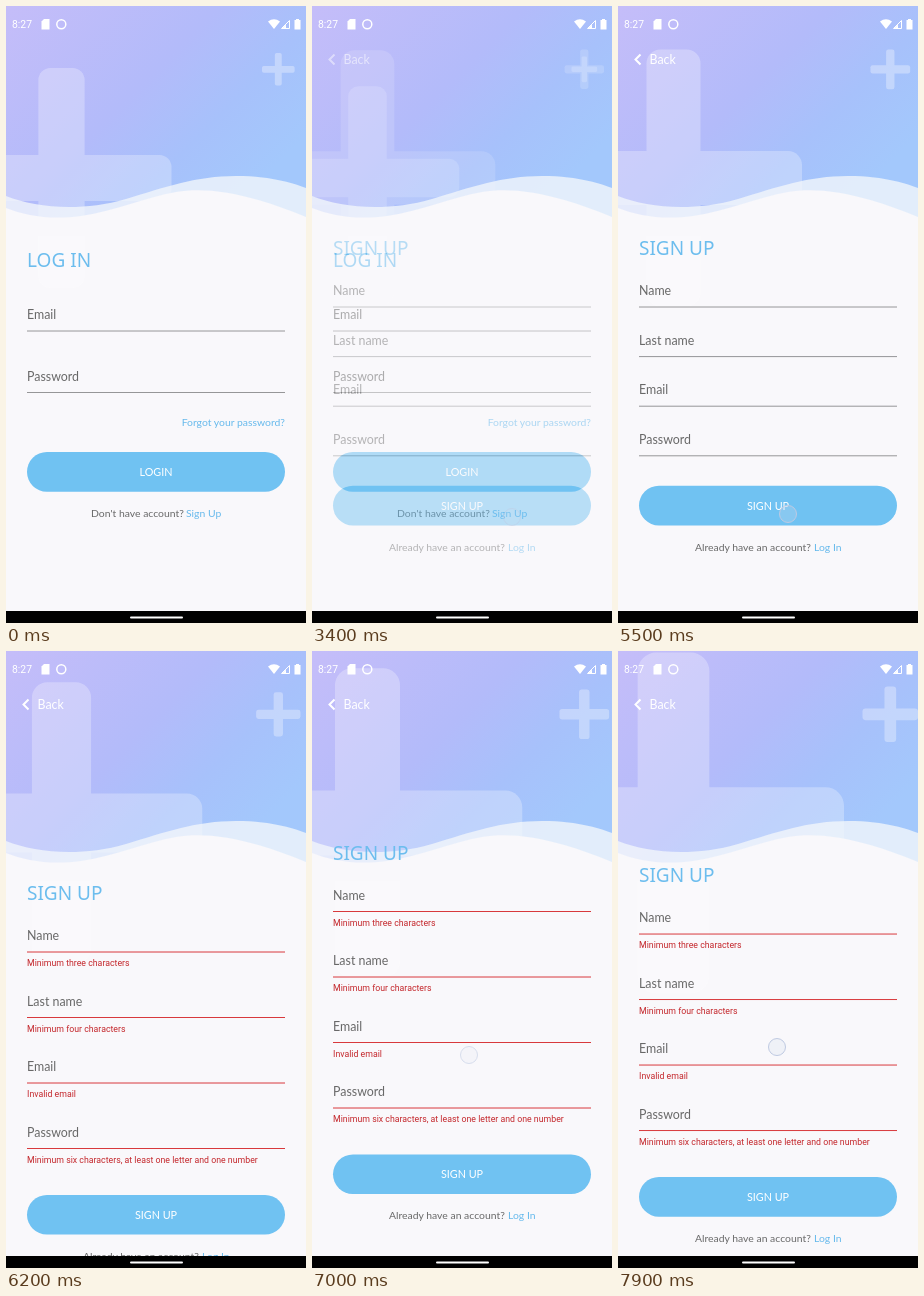
These frames come from a looping animation (300 px wide and 617 px high, 8000 ms). An HTML page:

```html
<!DOCTYPE html>
<html lang="en">
<head>
<meta charset="utf-8">
<title>Login and sign up</title>
<style>
html, body { margin: 0; width: 100%; height: 100%; overflow: hidden; background: #f9f8fb; }
svg { display: block; width: 300px; height: 617px; }
text { font-family: Lato, sans-serif; font-size: 10.4px; fill: #686868; white-space: pre; }
.title { font: 400 19px "Noto Sans", "Open Sans", sans-serif; font-stretch: extra-condensed; fill: #6cbdee; }
.label, .back { font-size: 12.4px; }
.link { fill: #66b9ec; }
.cap { font-size: 10.8px; }
.cap, .back { fill: #fff; }
.error { font-family: Roboto, sans-serif; font-size: 8.78px; fill: #c4282d; }
.clock { font-family: Roboto, sans-serif; font-size: 10.4px; fill: #fff; }
.line { stroke: #969698; stroke-width: 1; }
.line.bad { stroke: #d8393c; }
</style>
</head>
<body>
<svg id="stage" viewBox="0 0 300 617">
  <defs>
    <linearGradient id="sky" gradientUnits="userSpaceOnUse" x1="20" y1="-20" x2="235" y2="195">
      <stop offset="0" stop-color="#c5bdf9"/>
      <stop offset=".5" stop-color="#b3bbfa"/>
      <stop offset=".75" stop-color="#a7c1fb"/>
      <stop offset="1" stop-color="#a3c8fc"/>
    </linearGradient>
    <g id="plus" fill="#fff">
      <rect x="-21" y="-100" width="42" height="200" rx="11"/>
      <rect x="-100" y="-21" width="200" height="42" rx="11"/>
    </g>
  </defs>
  <g id="login"></g>
  <g id="signup"></g>
  <circle id="touch" r="8.5" fill="#d5dcec" fill-opacity=".25" stroke="#bfcae2"/>
  <g fill="#fff">
    <text class="clock" x="6" y="22">8:27</text>
    <path d="M38 13h5.5v10.5h-8V15.500z"/>
    <circle cx="55.300" cy="18.300" r="4.500" fill="none" stroke="#fff" stroke-width="1.500"/>
    <path d="M262 15.500Q268 11 274 15.500L268 23z"/>
    <path d="M275.500 22.500H283.500V14.500z" fill="none" stroke="#fff"/>
    <path d="M276 22.500H280V18.500z"/>
    <path d="M290 14V13h3v1h1.500v9.500h-6V14z"/>
  </g>
  <path d="M0 605h300v12H0z"/>
  <rect x="124" y="610.500" width="53" height="2" rx="1" fill="#fff"/>
</svg>
<script>
const LOOP = 8000;
const $ = id => document.getElementById(id);

const text = (cls, x, y, str, anchor = 'start') =>
  `<text class="${cls}" x="${x}" y="${y}" text-anchor="${anchor}">${str}</text>`;
const line = (y, cls = '') => `<path class="line ${cls}" d="M21 ${y}H279"/>`;
const button = (y, label) =>
  `<rect x="21" y="${y}" width="258" height="39.7" rx="19.85" fill="#70c2f2"/>` +
  text('cap', 150, y + 24, label, 'middle');
const field = (y, label, error) =>
  text('label', 21, y, label) + line(y + 12, error && 'bad') +
  (error ? text('error', 21, y + 26, error) : '');
const prompt = (y, x, question, linkX, link) =>
  text('', x, y, question) + text('link', linkX, y, link);

const header = `
  <path d="M0 0h300v617H0z" fill="#f9f8fb"/>
  <path d="M0 0h300v215H0z" fill="url(#sky)"/>
  <g opacity=".28"><use class="big" href="#plus"/></g>
  <g opacity=".33"><use class="small" href="#plus"/></g>
  <path d="M0 190C30 202 75 206 120 193C160 181 190 170 230 170C262 170 285 176 300 182V230H0z" fill="#f4f8fb" fill-opacity=".78"/>
  <path d="M0 202C20 210 45 214 75 210C110 205 140 191 170 186C200 181 240 186 300 211V230H0z" fill="#f9f8fb"/>`;

function form(errors) {
  const names = ['Name', 'Last name', 'Email', 'Password'];
  const step = errors ? 65.5 : 49.6;
  const shift = errors ? 64.2 : 0;
  return text('title', 21, 249, 'SIGN UP') +
    names.map((name, i) => field(289 + i * step, name, errors && errors[i])).join('') +
    button(479.7 + shift, 'SIGN UP') +
    prompt(544.7 + shift, 77, 'Already have an account?', 196, 'Log In');
}

$('login').innerHTML = header +
  text('title', 21, 261, 'LOG IN') +
  field(313, 'Email') + field(374.5, 'Password') +
  text('link', 279, 420, 'Forgot your password?', 'end') +
  button(446, 'LOGIN') +
  prompt(511, 85, "Don't have account?", 180, 'Sign Up');

$('signup').innerHTML = header +
  `<path d="M22.500 48.500L17.500 53.500L22.500 58.500" fill="none" stroke="#fff" stroke-width="2"/>` +
  text('back', 31.5, 58, 'Back') +
  `<g id="plain">${form()}</g><g id="invalid">` +
  form(['Minimum three characters', 'Minimum four characters', 'Invalid email',
    'Minimum six characters, at least one letter and one number']) + '</g>';

// Piecewise linear value from [time, value] steps
function track(steps, t) {
  if (t <= steps[0][0]) return steps[0][1];
  for (let i = 1; i < steps.length; i++) {
    const [t0, a] = steps[i - 1], [t1, b] = steps[i];
    if (t < t1) return a + (b - a) * (t - t0) / (t1 - t0);
  }
  return steps[steps.length - 1][1];
}

const SCROLL = [[6500, 0], [6900, -40.5], [7350, -40.5], [7900, -18], [8000, -14]];
const FADE = [[3250, 0], [3570, 1]];
// start, end, x, finger path
const TOUCHES = [
  [3000, 3350, 200, [[0, 511]]],
  [5200, 5500, 170, [[0, 508]]],
  [6450, 6960, 157, [[6500, 444], [6900, 404]]],
  [7300, 8100, 159, [[7350, 373.5], [7900, 396], [8000, 400]]]
];

function setPluses(page, size) {
  const place = (cls, x, y, half) => page.querySelector(cls)
    .setAttribute('transform', `translate(${x} ${y}) scale(${half / 100})`);
  place('.big', 55.5, 172, size);
  place('.small', 272.3, 63.3, 16.5 + (size - 111) * 0.19);
}

function draw(t) {
  const fade = track(FADE, t);
  $('signup').setAttribute('opacity', fade);
  setPluses($('login'), 89.5 + 0.0173 * Math.abs(t - 1185));
  setPluses($('signup'), 111 + 0.0175 * (t - 4500));

  const bad = t >= 5560;
  $('plain').style.display = bad ? 'none' : '';
  $('invalid').style.display = bad ? '' : 'none';
  $('invalid').setAttribute('transform', `translate(0 ${track(SCROLL, t)})`);

  const touch = TOUCHES.find(([start, end]) => t >= start && t < end + 100);
  $('touch').style.display = touch ? '' : 'none';
  if (touch) {
    const [start, end, x, path] = touch;
    $('touch').setAttribute('cx', x);
    $('touch').setAttribute('cy', track(path, t));
    $('touch').setAttribute('opacity',
      track([[start, 0], [start + 80, 1], [end, 1], [end + 100, 0]], t));
  }
}

const began = performance.now();
function tick() {
  draw((performance.now() - began) % LOOP);
  requestAnimationFrame(tick);
}
draw(0);
requestAnimationFrame(tick);
</script>
</body>
</html>
```
